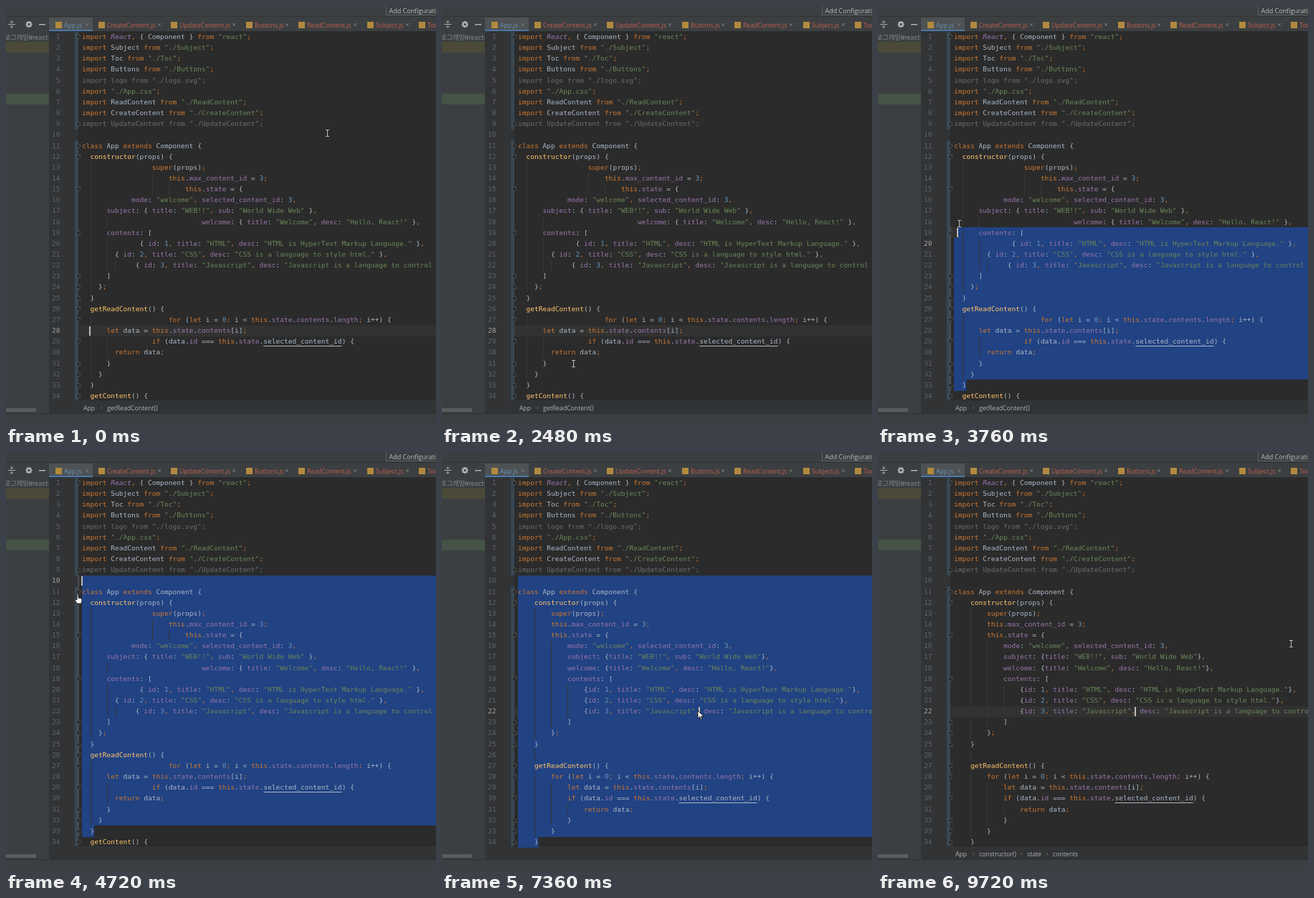
An HTML page with a canvas for the animation above (9880 ms loop, 600 by 582 pixels).

```html
<!DOCTYPE html>
<html lang="en">
<head>
<meta charset="utf-8">
<title>Code reformatting</title>
<style>
html, body { margin: 0; width: 100%; height: 100%; overflow: hidden; background: #3c3f41; }
canvas { display: block; }
</style>
</head>
<body>
<canvas id="stage" width="600" height="582"></canvas>
<script>
const ctx = document.getElementById('stage').getContext('2d');
const LOOP = 9880, STEP = 40;
const GUTTER_END = 101, LEFT = 106, CHAR = 5.756, ROW = 15.15, TOP = 35.6;
const MONO = '9.56px "DejaVu Sans Mono", monospace';
const UI = '8.7px "Open Sans", "Noto Sans CJK KR", sans-serif';

const FORMAT_AT = 6120, GUIDES_AT = 6400, CLICK_AT = 7360, DESELECT_AT = 7400;
const DRAG_START = 3160, DRAG_END = 4400;

const imports = `import React, { Component } from "react";
import Subject from "./Subject";
import Toc from "./Toc";
import Buttons from "./Buttons";
import logo from "./logo.svg";
import "./App.css";
import ReadContent from "./ReadContent";
import CreateContent from "./CreateContent";
import UpdateContent from "./UpdateContent";

class App extends Component {`.split('\n');

const body = `constructor(props) {
super(props);
this.max_content_id = 3;
this.state = {
mode: "welcome", selected_content_id: 3,
subject: { title: "WEB!!", sub: "World Wide Web" },
welcome: { title: "Welcome", desc: "Hello, React!" },
contents: [
{ id: 1, title: "HTML", desc: "HTML is HyperText Markup Language." },
{ id: 2, title: "CSS", desc: "CSS is a language to style html." },
{ id: 3, title: "Javascript", desc: "Javascript is a language to control html." },
]
};
}
getReadContent() {
for (let i = 0; i < this.state.contents.length; i++) {
let data = this.state.contents[i];
if (data.id === this.state.selected_content_id) {
return data;
}
}
}
getContent() {`.split('\n');

const messyIndent = [2, 17, 21, 25, 12, 6, 29, 6, 14, 8, 13, 6, 4, 2, 2, 21, 6, 17, 8, 6, 4, 2, 2];
const tidyIndent = [4, 8, 8, 8, 12, 12, 12, 12, 16, 16, 16, 12, 8, 4, 4, 8, 12, 12, 16, 12, 8, 4];

const indentWith = indents => indents.map((n, i) => ' '.repeat(n) + body[i]);
const messy = [...imports, ...indentWith(messyIndent)];
const tidyBody = indentWith(tidyIndent)
  .map(s => s.replace(/{ (?=id|title)/, '{').replace(/" },$/, '"},'));
tidyBody.splice(14, 0, '');
const tidy = [...imports, ...tidyBody];

const TOKEN = new RegExp([
  '(?<string>"[^"]*")',
  '(?<keyword>\\b(?:import|from|class|extends|super|this|let|for|if|return)\\b|[,;])',
  '(?<number>\\b\\d+)',
  '(?<method>constructor|get\\w+)',
  '(?<linked>(?<=\\.)selected_content_id)',
  '(?<italic>React(?=,))',
  '(?<property>(?<=\\.)\\w+|\\w+(?=:))',
  '(?<plain>\\w+|[^\\s\\w])'
].join('|'), 'g');
const COLORS = {
  string: '#6a8759', keyword: '#cc7832', number: '#6897bb', method: '#ffc66d',
  linked: '#a9b7c6', italic: '#9876aa', property: '#9876aa', plain: '#a9b7c6'
};

function tokenize(line, index) {
  const unused = index === 4 || index === 8;
  return [...line.matchAll(TOKEN)].map(m => {
    const kind = Object.keys(m.groups).find(k => m.groups[k] !== undefined);
    return { kind, text: m[0], col: m.index, color: unused ? '#6c6d70' : COLORS[kind] };
  });
}

// Each guide runs beside the deeper lines that follow its opening line.
function findGuides(lines) {
  const depth = lines.map(s => s ? s.search(/\S/) : Infinity);
  return depth.flatMap((col, i) => {
    if (!col || col === Infinity) return [];
    let end = i + 1;
    while (end < lines.length && depth[end] > col) end++;
    return end > i + 1 ? [{ col, from: i + 1, to: end }] : [];
  });
}

const makeDocument = lines => ({
  tokens: lines.map(tokenize),
  guides: findGuides(lines),
  folds: lines.flatMap((s, i) =>
    i === 0 || /[{[]$/.test(s) ? [{ row: i, dir: 1 }] :
    i === 8 || /^\s*[}\]]/.test(s) ? [{ row: i, dir: -1 }] : [])
});
const messyDoc = makeDocument(messy), tidyDoc = makeDocument(tidy);

// Pointer waypoints: time, x, y
const path = [
  [0, 448, 177], [350, 540, 320], [700, 340, 480], [1000, 300, 250], [1360, 438, 404],
  [1700, 300, 510], [2040, 254, 455], [2500, 180, 500], [2960, 121, 527], [3160, 121, 527],
  [3320, 121, 480], [3760, 113, 303], [4080, 109, 217], [4240, 106, 180], [4400, 105, 179],
  [4720, 100, 198], [5040, 118, 185], [7040, 118, 185], [7320, 357, 360], [7440, 357, 360],
  [8040, 300, 400], [8300, 150, 495], [8720, 430, 335], [9000, 430, 335], [9240, 576, 267],
  [LOOP, 576, 267]
];

function pointerAt(t) {
  const i = Math.max(1, path.findIndex(p => p[0] >= t));
  const [t0, x0, y0] = path[i - 1], [t1, x1, y1] = path[i];
  const k = (t - t0) / (t1 - t0);
  return { x: x0 + (x1 - x0) * k, y: y0 + (y1 - y0) * k };
}

function dragPosition(t) {
  const p = pointerAt(Math.min(DRAG_END, Math.max(DRAG_START, t)));
  return {
    row: Math.floor((p.y - TOP) / ROW),
    col: Math.max(0, Math.round((p.x - LEFT) / CHAR))
  };
}

const rowTop = row => Math.round(TOP + row * ROW);
const colX = col => LEFT + col * CHAR;
const baseline = row => Math.round(46 + row * ROW);

function rect(x, y, w, h, color) {
  ctx.fillStyle = color;
  ctx.fillRect(x, y, w, h);
}

function text(str, x, y, color, font = UI) {
  ctx.font = font;
  ctx.fillStyle = color;
  ctx.fillText(str, x, y);
}

function lines(points, color, width = 1) {
  ctx.strokeStyle = color;
  ctx.lineWidth = width;
  ctx.beginPath();
  for (const [x0, y0, x1, y1] of points) {
    ctx.moveTo(x0, y0);
    ctx.lineTo(x1, y1);
  }
  ctx.stroke();
}

function drawTabs() {
  rect(60, 16, 61, 19, '#4e5254');
  rect(60, 33, 61, 2, '#4a78a8');
  const tabs = [
    ['App.js', 69, 113], ['CreateContent.js', 129, 214], ['UpdateContent.js', 230, 318],
    ['Buttons.js', 335, 392], ['ReadContent.js', 408, 487], ['Subject.js', 504, 560], ['Toc.js', 576, 620]
  ];
  tabs.forEach(([name, x, close], i) => {
    rect(x, 22, 9, 9, '#b18a3f');
    text(name, x + 12, 30, i ? '#c4604f' : '#6897bb');
    lines([[close - 2, 24, close + 2, 28], [close + 2, 24, close - 2, 28]], '#7c7f81', 0.9);
  });
}

function drawSidebar() {
  const ink = '#afb1b3';
  lines([[3, 25.5, 13, 25.5], [8, 20, 8, 23.5], [8, 27.5, 8, 31],
    [6, 21.5, 8, 23.5], [10, 21.5, 8, 23.5], [6, 29.5, 8, 27.5], [10, 29.5, 8, 27.5]], ink);
  ctx.strokeStyle = ink;
  ctx.lineWidth = 2.2;
  ctx.beginPath();
  ctx.arc(32, 25.5, 2.7, 0, 7);
  ctx.stroke();
  for (let i = 0; i < 4; i++) {
    const a = i * Math.PI / 4, c = Math.cos(a), s = Math.sin(a);
    lines([[32 + 3 * c, 25.5 + 3 * s, 32 + 4.7 * c, 25.5 + 4.7 * s],
      [32 - 3 * c, 25.5 - 3 * s, 32 - 4.7 * c, 25.5 - 4.7 * s]], ink, 1.7);
  }
  rect(46, 25, 9, 1.5, ink);
  ctx.save();
  ctx.beginPath();
  ctx.rect(0, 36, 60, 15);
  ctx.clip();
  text('로그래밍₩react-', -2, 46.5, '#85888a', '9.2px "Noto Sans CJK KR", "Open Sans", sans-serif');
  ctx.restore();
  rect(0, 50, 60, 15, '#4b4a38');
  rect(0, 122, 60, 15, '#445345');
  rect(0, 560, 42, 5, '#595b5d');
}

function drawFrame() {
  rect(0, 0, 600, 582, '#3c3f41');
  rect(0, 14, 600, 1, '#323232');
  ctx.strokeStyle = '#5e6060';
  ctx.lineWidth = 1;
  ctx.strokeRect(530.5, -5.5, 90, 18);
  text('Add Configuration', 534.5, 10, '#bbbbbb', '9px "Open Sans", sans-serif');
  drawSidebar();
  drawTabs();
  rect(60, 35, 540, 514, '#2b2b2b');
  rect(60, 35, GUTTER_END - 60, 514, '#313335');
  rect(60, 549, 540, 18, '#313335');
  rect(0, 567, 600, 1, '#2f3133');
}

function drawSelection(from, to) {
  for (let row = from.row; row <= to.row; row++) {
    const x0 = row === from.row ? colX(from.col) : LEFT;
    const x1 = row === to.row ? colX(to.col) : 600;
    rect(x0, rowTop(row), x1 - x0, rowTop(row + 1) - rowTop(row), '#214283');
  }
}

function drawGutter(doc, currentRow, selection) {
  rect(GUTTER_END - 5, rowTop(0), 5, rowTop(9) - rowTop(0), '#374752');
  rect(GUTTER_END - 5, rowTop(10), 5, 549 - rowTop(10), '#374752');
  ctx.textAlign = 'right';
  for (let row = 0; row < 34; row++)
    text(row + 1, 75.6, baseline(row), row === currentRow ? '#a4a3a3' : '#606366', MONO);
  ctx.textAlign = 'left';
  if (selection && doc === messyDoc) {
    const y0 = rowTop(selection.from.row), y1 = rowTop(selection.to.row + 1);
    rect(100.5, y0, 1, y1 - y0, '#606366');
  }
  for (const { row, dir } of doc.folds) {
    const y = baseline(row) - 3;
    ctx.beginPath();
    for (const [dx, dy] of [[-2.5, -2.7], [2.5, -2.7], [2.5, 0.8], [0, 3], [-2.5, 0.8]])
      ctx.lineTo(GUTTER_END + dx, y + dy * dir);
    ctx.closePath();
    ctx.fillStyle = '#2b2b2b';
    ctx.fill();
    ctx.strokeStyle = '#55585a';
    ctx.lineWidth = 0.8;
    ctx.stroke();
  }
}

function drawCode(doc) {
  doc.tokens.forEach((tokens, row) => tokens.forEach(({ kind, text: str, col, color }) => {
    text(str, colX(col), baseline(row), color, kind === 'italic' ? 'italic ' + MONO : MONO);
    if (kind === 'linked') rect(colX(col), baseline(row) + 3, str.length * CHAR, 1, color);
  }));
}

function drawBreadcrumbs(t) {
  const crumbs = t < 4400 ? [['App', 108], ['getReadContent()', 141]] :
    t < 7560 ? [] : [['App', 108], ['constructor()', 141], ['state', 208], ['contents', 244]];
  crumbs.forEach(([name, x], i) => {
    text(name, x, 562.5, '#b0b2b4');
    if (i) text('›', x - 9, 562, '#7d8082');
  });
}

const ARROW = new Path2D('M0 0V11L2.6 8.6L4.3 12.4L6 11.6L4.4 8H8Z');
const HAND = new Path2D('M-1 0Q0-1 1 0V5L5 6Q6.5 6.5 6 9L5 13H-1L-4 8Q-4 6-1 8Z');

function drawPointer(t) {
  if (t >= 5720 && t < 7040) return;
  const { x, y } = pointerAt(t);
  if (t <= DRAG_END || t >= DESELECT_AT) {
    const cx = Math.round(x) + 0.5, cy = Math.round(y);
    lines([[cx, cy - 4, cx, cy + 4], [cx - 2.5, cy - 4.5, cx + 2.5, cy - 4.5],
      [cx - 2.5, cy + 4.5, cx + 2.5, cy + 4.5]], '#bbbbbb');
    return;
  }
  const shape = x < 105 ? HAND : ARROW;
  ctx.save();
  ctx.translate(x, y);
  ctx.fillStyle = '#ffffff';
  ctx.strokeStyle = '#1c1c1c';
  ctx.lineWidth = 1;
  ctx.fill(shape);
  ctx.stroke(shape);
  ctx.restore();
}

const caretHidden = [[300, 800], [1300, 1800], [2300, 2800], [5720, CLICK_AT], [8220, 8720], [9220, 9720]];

function render(t) {
  const doc = t < FORMAT_AT ? messyDoc : tidyDoc;
  const dragged = dragPosition(t - STEP);
  const caret = t < DRAG_START ? { row: 27, col: 2 } : t < CLICK_AT ? dragged : { row: 21, col: 44 };
  const currentRow = t >= DRAG_START && t < CLICK_AT ? dragPosition(t - 2 * STEP).row : caret.row;
  const selection = t >= DRAG_START && t < DESELECT_AT &&
    { from: dragged, to: doc === messyDoc ? { row: 32, col: 3 } : { row: 33, col: 5 } };

  drawFrame();
  rect(GUTTER_END, rowTop(caret.row), 600 - GUTTER_END, 15, '#323232');
  if (selection) drawSelection(selection.from, selection.to);
  if (t < FORMAT_AT || t >= GUIDES_AT)
    for (const { col, from, to } of doc.guides)
      rect(Math.round(colX(col)), rowTop(from), 1, rowTop(to) - rowTop(from), '#373737');
  drawGutter(doc, currentRow, selection);
  drawCode(doc);
  if (!caretHidden.some(([a, b]) => t >= a && t < b))
    rect(Math.floor(colX(caret.col)) - 1, rowTop(caret.row) + 1, 2, 13, '#bbbbbb');
  drawBreadcrumbs(t);
  drawPointer(t);
}

function tick() {
  const t = performance.now() % LOOP;
  render(Math.floor(t / STEP) * STEP);
  requestAnimationFrame(tick);
}
tick();
</script>
</body>
</html>
```
